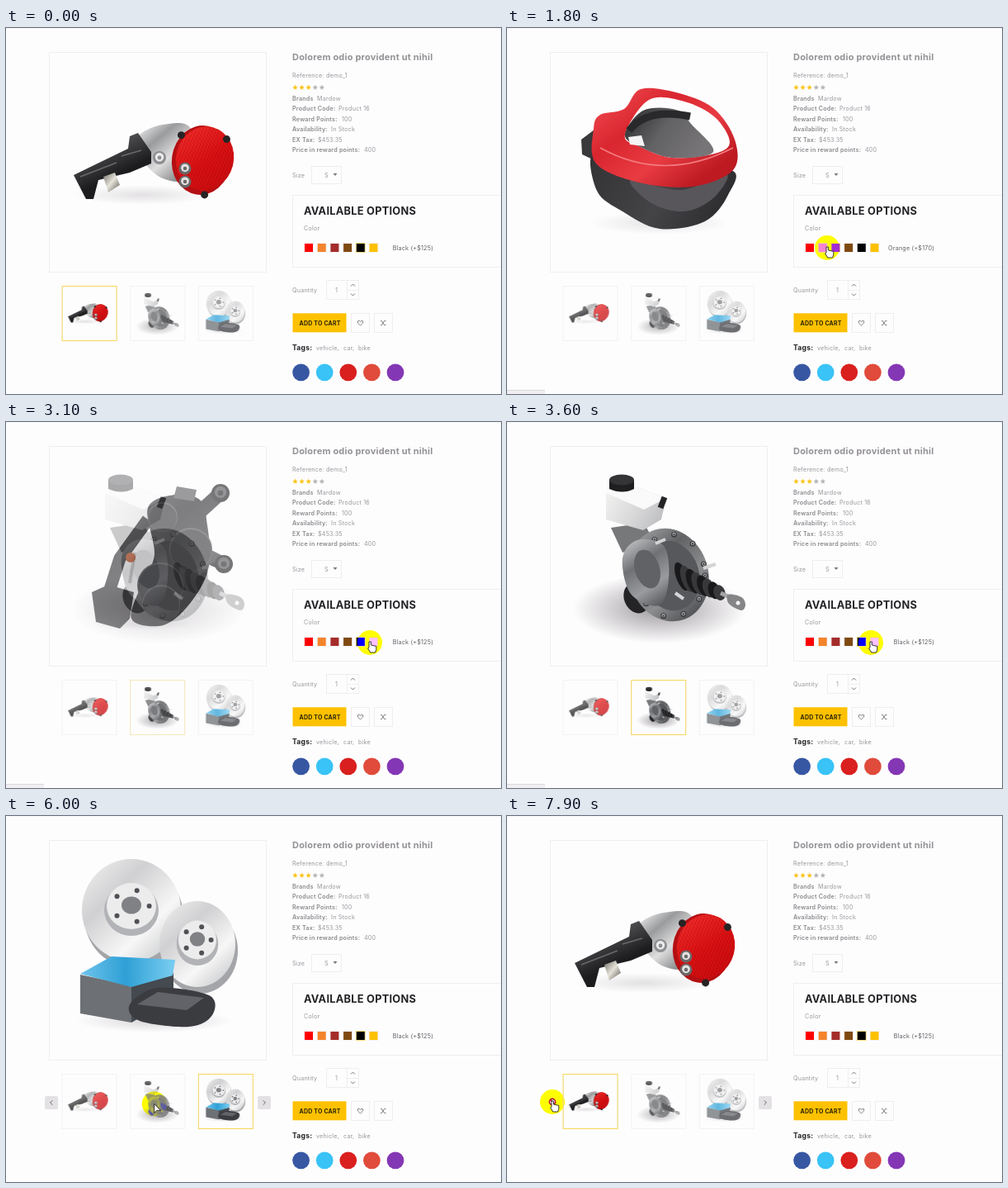
Recreate the animation shown at these times as an HTML page with a canvas. Size 600 by 443 pixels, loop 8000 ms.

```html
<!DOCTYPE html>
<html lang="en">
<head>
<meta charset="utf-8">
<title>Product page</title>
<style>
html, body { margin: 0; width: 100%; height: 100%; overflow: hidden; background: #fefdfe; }
canvas, svg, #halo { position: absolute; left: 0; top: 0; }
#halo { width: 30px; height: 30px; margin: -15px 0 0 -15px; border-radius: 50%; background: #00f; mix-blend-mode: difference; }
text { font: 400 7.2px Inter, "Open Sans", sans-serif; letter-spacing: .2px; fill: #98969a; white-space: pre; }
.b { font-weight: 600; fill: #8a888c; }
.title { font-size: 11px; font-weight: 700; letter-spacing: .2px; fill: #949296; }
.head { font-size: 12.8px; font-weight: 700; letter-spacing: .25px; fill: #232225; }
.dark { fill: #605e62; }
.buy { font-size: 7px; font-weight: 700; fill: #2d2508; }
.tags { font-size: 8.6px; font-weight: 700; fill: #232225; }
</style>
</head>
<body>
<canvas id="stage" width="600" height="443"></canvas>
<svg width="600" height="443">
  <text class="title" x="347" y="38.5">Dolorem odio provident ut nihil</text>
  <text x="347" y="60">Reference: demo_1</text>
  <text class="b" x="347" y="88">Brands</text><text x="377" y="88">Mardow</text>
  <text class="b" x="347" y="100">Product Code:</text><text x="403" y="100">Product 16</text>
  <text class="b" x="347" y="112.5">Reward Points:</text><text x="407" y="112.5">100</text>
  <text class="b" x="347" y="125">Availability:</text><text x="394" y="125">In Stock</text>
  <text class="b" x="347" y="137.5">EX Tax:</text><text x="378" y="137.5">$453.35</text>
  <text class="b" x="347" y="150">Price in reward points:</text><text x="434" y="150">400</text>
  <text x="347" y="180.5">Size</text><text x="386" y="180.5">S</text>
  <text class="head" x="361" y="226">AVAILABLE OPTIONS</text>
  <text x="361" y="245">Color</text>
  <text class="dark" id="label" x="518" y="268.5" text-anchor="end"></text>
  <text x="347" y="320">Quantity</text><text x="399" y="320">1</text>
  <text class="buy" x="355.5" y="359.5">ADD TO CART</text>
  <text class="tags" x="347" y="390">Tags:</text>
  <text x="376" y="390">vehicle,</text><text x="409" y="390">car,</text><text x="427" y="390">bike</text>
</svg>
<div id="halo"></div>
<svg width="600" height="443">
  <g id="cursor">
    <g id="no" fill="#fff" stroke="#b3122c" stroke-width="1.6"><circle r="3.6"/><path d="M-2.5-2.5 2.5 2.5"/></g>
    <path id="hand" fill="#fff" stroke="#222" stroke-width=".9" d="M-1 6V-1H1.4V3L7.8 4.4V8.4L6.6 12H.8L-2.4 7Z" stroke-linejoin="round"/>
    <path id="arrow" fill="#fff" stroke="#222" stroke-width=".9" d="M0 0V11L3 8H7.8Z"/>
  </g>
</svg>
<script>
const $ = id => document.getElementById(id);
const ctx = $('stage').getContext('2d');
let g = ctx;

// drawing helpers, all working on the current context g
const fill = (color, d) => { g.fillStyle = color; g.fill(new Path2D(d)); };
const line = (color, w, d) => { g.strokeStyle = color; g.lineWidth = w; g.stroke(new Path2D(d)); };
const oval = (color, x, y, rx, ry = rx, rot = 0) => {
  g.fillStyle = color;
  g.beginPath();
  g.ellipse(x, y, rx, ry, rot, 0, 7);
  g.fill();
};
const rect = (color, x, y, w, h) => { g.fillStyle = color; g.fillRect(x, y, w, h); };
const box = (color, x, y, w, h) => { g.strokeStyle = color; g.lineWidth = 1; g.strokeRect(x + .5, y + .5, w - 1, h - 1); };
const grad = (x0, y0, x1, y1, ...colors) => {
  const s = g.createLinearGradient(x0, y0, x1, y1);
  colors.forEach((c, i) => s.addColorStop(i / (colors.length - 1), c));
  return s;
};
const shadow = (x, y, rx, ry, a) => {
  g.save();
  g.translate(x, y);
  g.scale(rx, ry);
  const s = g.createRadialGradient(0, 0, 0, 0, 0, 1);
  s.addColorStop(0, `rgba(60,55,60,${a})`);
  s.addColorStop(1, 'rgba(60,55,60,0)');
  oval(s, 0, 0, 1);
  g.restore();
};
// smooth closed curve through a few points
const blob = (color, text) => {
  const pts = text.split(' ').map(p => p.split(',').map(Number));
  const at = i => pts[(i + pts.length) % pts.length];
  g.beginPath();
  g.moveTo(...pts[0]);
  pts.forEach((b, i) => {
    const [a, c, d] = [at(i - 1), at(i + 1), at(i + 2)];
    g.bezierCurveTo(b[0] + (c[0] - a[0]) / 6, b[1] + (c[1] - a[1]) / 6, c[0] - (d[0] - b[0]) / 6, c[1] - (d[1] - b[1]) / 6, ...c);
  });
  g.fillStyle = color;
  g.fill();
};
const bolt = (x, y, r, dark, light) => {
  oval(dark, x, y, r);
  oval(light, x, y - r * .1, r * .65);
  oval(dark, x, y, r * .3);
};

function pump() {
  shadow(165, 202, 85, 12, .14);
  blob(grad(160, 120, 210, 180, '#eee', '#9a9b9d', '#dedede', '#8d8e90'), '160,132 190,117 224,122 220,180 190,182 166,160');
  bolt(186, 157, 8, '#8e8f92', '#ececec');
  fill(grad(110, 150, 125, 182, '#4c4c4e', '#1c1c1e'), 'M82 178L148 146 150 131 160 127 176 150V164L150 175 112 184 106 207 97 207Z');
  line('#69696c', 1.5, 'M90 180L134 163M140 155L164 148');
  fill(grad(118, 180, 137, 195, '#8a8780', '#e6e3da', '#77746c'), 'M118 180L132 175 138 190 124 199Z');
  oval('#b40f12', 237, 160, 36, 42, .15);
  oval(grad(215, 120, 270, 200, '#f52f2d', '#dc1113', '#c70c0f'), 241, 158, 35, 39, .25);
  g.save();
  g.clip();
  for (let x = 160; x < 330; x += 4) line('rgba(150,0,10,.25)', 1, `M${x} 110l-40 100M${x - 50} 110l70 100`);
  g.restore();
  for (const a of [-.65, 1.5, 3.95]) oval('#282324', 238 + 37 * Math.cos(a), 160 + 42 * Math.sin(a), 4.5);
  for (const y of [170, 186]) bolt(217, y, 7.5, '#6a6768', '#e4e2e0');
}

function holder() {
  shadow(185, 236, 85, 14, .13);
  fill('#39393c', 'M90 135L110 120V162L91 153Z');
  blob(grad(105, 160, 270, 240, '#343437', '#444447', '#29292c'), '107,150 180,180 271,172 268,202 240,234 185,243 140,222 109,197');
  blob('#58565a', '150,184 210,196 266,177 250,206 215,222 175,212');
  blob(grad(130, 75, 220, 195, '#ee454b', '#d9262f', '#e93b42', '#bd1a22'),
    '105,122 113,105 142,98 162,74 205,78 250,97 276,135 274,172 225,192 160,187 108,164');
  blob('#fefdfe', '143,129 172,87 215,89 252,108 270,138 252,152 200,157 160,143');
  blob(grad(145, 95, 230, 155, '#29292b', '#626164', '#777578'), '143,129 165,100 205,99 224,117 250,150 200,157 160,143');
  line('#29292b', 9, 'M148 124Q170 96 222 107');
  fill('#f4f4f4', 'M147 132L163 130 167 143 149 141Z');
  line('#f47c80', 1.5, 'M113 145Q190 188 274 145');
}

function caliper() {
  shadow(165, 244, 62, 8, .12);
  const metal = grad(130, 90, 240, 240, '#525154', '#303033', '#454447', '#29292c');
  line(metal, 15, 'M172 118L138 165 122 215');
  line('#c9c7c8', 4, 'M156 158L150 195');
  oval('#c0562d', 151, 164, 6);
  line(metal, 17, 'M225 118L260 86M230 155L264 172');
  blob(metal, '172,104 205,88 236,95 244,125 247,165 238,197 212,232 185,247 152,238 165,195 180,160');
  fill(metal, 'M104 206L124 197 155 206 150 238 138 250 109 242Z');
  fill('#5f5e61', 'M207 78L231 82 228 96 203 92Z');
  for (const [x, y, r] of [[190, 115, 18], [224, 154, 26], [187, 198, 28], [188, 220, 23]]) {
    oval('#5a595c', x, y, r);
    oval('#39393c', x, y + 1, r - 1);
  }
  bolt(260, 86, 11, '#242426', '#56555a');
  bolt(264, 172, 11, '#242426', '#56555a');
}

function cylinder() {
  shadow(185, 226, 105, 42, .5);
  fill('#77787a', 'M126 128L166 122 180 148 140 158Z');
  oval('#242426', 157, 213, 15, 19, -.4);
  oval(grad(150, 135, 235, 235, '#a5a6a8', '#626365', '#8d8e90', '#47484b'), 196, 185, 48, 57, -.3);
  for (let a = 0; a < 6.2; a += .6) bolt(199 + 41 * Math.cos(a), 186 + 50 * Math.sin(a), 3.5, '#3b3c3f', '#999a9c');
  oval('#57585b', 198, 186, 35, 43, -.3);
  blob(grad(140, 150, 190, 225, '#bcbdbf', '#707174', '#9a9b9e', '#4d4e51'), '140,165 158,143 190,150 196,190 184,222 150,208');
  oval('#606265', 170, 178, 15, 24, -.3);
  line('#d4d4d5', 4, 'M238 177L253 172M204 207L214 214M180 147L192 142');
  for (let i = 0; i < 8; i++) {
    oval(i % 2 ? '#38383b' : '#19191b', 212 + i * 6.5, 187 + i * 2.8, 7, 18 - i * 1.2, -.35);
  }
  line('#a5a5a7', 5, 'M259 207L272 213');
  blob('#858587', '268,209 284,212 289,221 284,228 269,220');
  oval('#f3f3f3', 280, 219, 2.5);
  fill(grad(120, 90, 190, 130, '#f0f0ef', '#d8d8d9', '#b9babc'), 'M120 86L158 79 193 92 187 118 165 131 120 118Z');
  fill('#fafafa', 'M120 86L158 79 193 92 166 106Z');
  fill('#1f1f21', 'M124 70H154V81Q140 88 124 81Z');
  oval('#343437', 139, 70, 15, 6.5);
  line('#242427', 7, 'M186 104L191 91');
}

function disc(x, y, rx, ry) {
  oval('#a4a5a8', x + 3, y + 8, rx, ry);
  oval(grad(x - rx, y - ry, x + rx, y + ry, '#f3f3f3', '#d0d0d2', '#f7f7f7', '#bcbdbf'), x, y, rx, ry);
  oval('#b2b3b6', x, y, rx * .55, ry * .5);
  oval('#ececed', x, y - 5, rx * .5, ry * .45);
  oval('#808184', x, y - 6, rx * .2, ry * .17);
  for (let a = 0; a < 6; a += 1.257) oval('#505155', x + rx * .36 * Math.cos(a), y - 5 + ry * .32 * Math.sin(a), 3);
}

function discs() {
  shadow(180, 248, 95, 14, .2);
  disc(152, 114, 60, 62);
  disc(232, 155, 46, 52);
  fill('#6d7074', 'M90 192L152 205V250L90 239Z');
  fill('#444a50', 'M152 205L203 190V222L152 250Z');
  fill(grad(90, 180, 200, 180, '#6fc4ec', '#2fa0d5', '#74caef'), 'M90 191L128 170 205 174 202 193 152 207Z');
  blob('#3b3c40', '150,228 184,208 246,217 250,241 222,255 162,248');
  fill('#626368', 'M159 228L184 213 240 220 219 235Z');
}

// every picture in full size and as a quarter-size thumbnail
const shot = draw => [1, .25].map(k => {
  const c = document.createElement('canvas');
  c.width = 264 * k;
  c.height = 267 * k;
  g = c.getContext('2d');
  rect('#fefdfe', 0, 0, 264, 267);
  g.scale(k, k);
  g.translate(-52, -29);
  draw();
  g = ctx;
  return c;
});
const pics = { pump, holder, caliper, cylinder, discs };
for (const name in pics) pics[name] = shot(pics[name]);
const thumbs = ['pump', 'cylinder', 'discs'];

const swatches = ['#fe0000', '#f4842c', '#a42c2a', '#7f4a12', '#000', '#fdc100'];
const social = ['#3757a3', '#39c3f6', '#d9201f', '#e04b3b', '#8437b4'];
const labels = { 1: 'Orange (+$170)', 3: 'Brown (+$120)', 4: 'Black (+$125)' };

// each step: when the pointer has arrived, where, its look, the picture and swatch it picks
const steps = [
  [0, 330, 462, 'arrow', 'pump', 4],
  [700, 367, 267, 'hand', 'pump', 4],
  [1200, 388, 266, 'hand', 'holder', 1],
  [2130, 409, 267, 'hand', 'caliper', 3],
  [2950, 441, 267, 'hand', 'cylinder', 4],
  [4450, 332, 356, 'no', 'cylinder', 4],
  [4900, 317, 351, 'no', 'cylinder', 4],
  [5600, 317, 351, 'hand', 'discs', 4],
  [6250, 54, 346, 'hand', 'discs', 4],
  [6680, 54, 346, 'hand', 'cylinder', 4],
  [7350, 55, 346, 'no hand', 'pump', 4]
];
const FADE = 400, LOOP = 8000, EDGE = '#efedf0';

function star(x, y, color) {
  let d = 'M';
  for (let i = 0; i < 10; i++) {
    const r = i % 2 ? 1.5 : 3.4, a = i * Math.PI / 5;
    d += `${x + r * Math.sin(a)} ${y - r * Math.cos(a)} `;
  }
  fill(color, d + 'Z');
}

function panel(picked) {
  for (let i = 0; i < 5; i++) star(350.5 + i * 8.1, 72, i < 3 ? '#f9c41a' : '#b5b3b6');
  box(EDGE, 370, 167, 37, 22);
  fill('#777', 'M396.5 176H401.5L399 179Z');
  box(EDGE, 347, 202, 260, 88);
  swatches.forEach((c, i) => {
    const x = 361 + i * 15.7;
    box(i === picked ? '#f6dc7a' : '#f3f1f4', x, 260, 12, 12);
    rect(c, x + 1, 261, 10, 10);
  });
  box(EDGE, 388, 305, 40, 24);
  rect(EDGE, 413, 305, 1, 24);
  rect(EDGE, 413, 317, 15, 1);
  line('#777', 1, 'M418 312.5L420.5 310 423 312.5M418 321.5L420.5 324 423 321.5');
  rect('#fdc100', 347.5, 345.3, 65, 23);
  box(EDGE, 418, 345, 23, 24);
  box(EDGE, 446, 345, 23, 24);
  line('#666', .8, 'M429.5 360L426.4 357Q425.5 354 428 354L429.5 355.5 431 354Q433.5 354 432.6 357Z');
  line('#666', .8, 'M454 354.5H455.5L458.5 359.5H460.5M454 359.5H455.5L458.5 354.5H460.5');
  social.forEach((c, i) => oval(c, 357.6 + i * 28.6, 416.8, 10.4));
}

function slideButton(x, dir, bare) {
  if (!bare) {
    g.fillStyle = '#e3e1e4';
    g.beginPath();
    g.roundRect(x - 8, 339, 16, 16, 2);
    g.fill();
  }
  line('#666', 1, `M${x - dir * 1.3} 344.3l${dir * 2.7} 2.7 ${-dir * 2.7} 2.7`);
}

function gallery(before, now, p) {
  g.drawImage(pics[before][0], 52, 29);
  g.globalAlpha = p;
  g.drawImage(pics[now][0], 52, 29);
  g.globalAlpha = 1;
  box(EDGE, 52, 29, 264, 267);
  thumbs.forEach((name, i) => {
    const x = 67.6 + i * 82.6;
    const on = (now === name) * p + (before === name) * (1 - p);
    g.globalAlpha = .75 + .25 * on;
    g.drawImage(pics[name][1], x, 312);
    g.globalAlpha = 1;
    box('#f3f1f4', x, 312, 67, 67);
    g.globalAlpha = on;
    box('#f5d75c', x, 312, 67, 67);
    g.globalAlpha = 1;
  });
}

function pointer(t, a, b) {
  const gap = Math.hypot(b[1] - a[1], b[2] - a[2]);
  const time = 250 + gap;
  const k = Math.max(0, 1 - (b[0] - t) / time);
  const e = k * k * (3 - 2 * k);
  const x = a[1] + (b[1] - a[1]) * e, y = a[2] + (b[2] - a[2]) * e;
  $('halo').style.transform = `translate(${x}px,${y}px)`;
  $('cursor').setAttribute('transform', `translate(${x} ${y})`);
  const look = k > 0 && gap > 40 ? 'arrow' : a[3];
  for (const id of ['arrow', 'hand', 'no']) $(id).style.display = look.includes(id) ? '' : 'none';
}

function frame(t) {
  const i = steps.findLastIndex(s => s[0] <= t);
  const now = steps[i], before = steps[i - 1] || now, next = steps[i + 1] || now;
  rect('#fefdfe', 0, 0, 600, 443);
  rect('#f6f5f7', 0, 0, 600, 1);
  gallery(before[4], now[4], Math.min(1, (t - now[0]) / FADE));
  panel(now[5]);
  if (t >= 4300) slideButton(55, -1, t > 6200);
  if (t >= 5800) slideButton(313, 1);
  if (t >= 700 && t < 3750) {
    rect('#f1eff2', 0, 439, 46, 4);
    rect('#dad8db', 0, 438, 46, 1);
  }
  $('label').textContent = labels[now[5]];
  pointer(t, now, next);
}

const start = performance.now();
function tick() {
  frame((performance.now() - start) % LOOP);
  requestAnimationFrame(tick);
}
tick();
</script>
</body>
</html>
```
